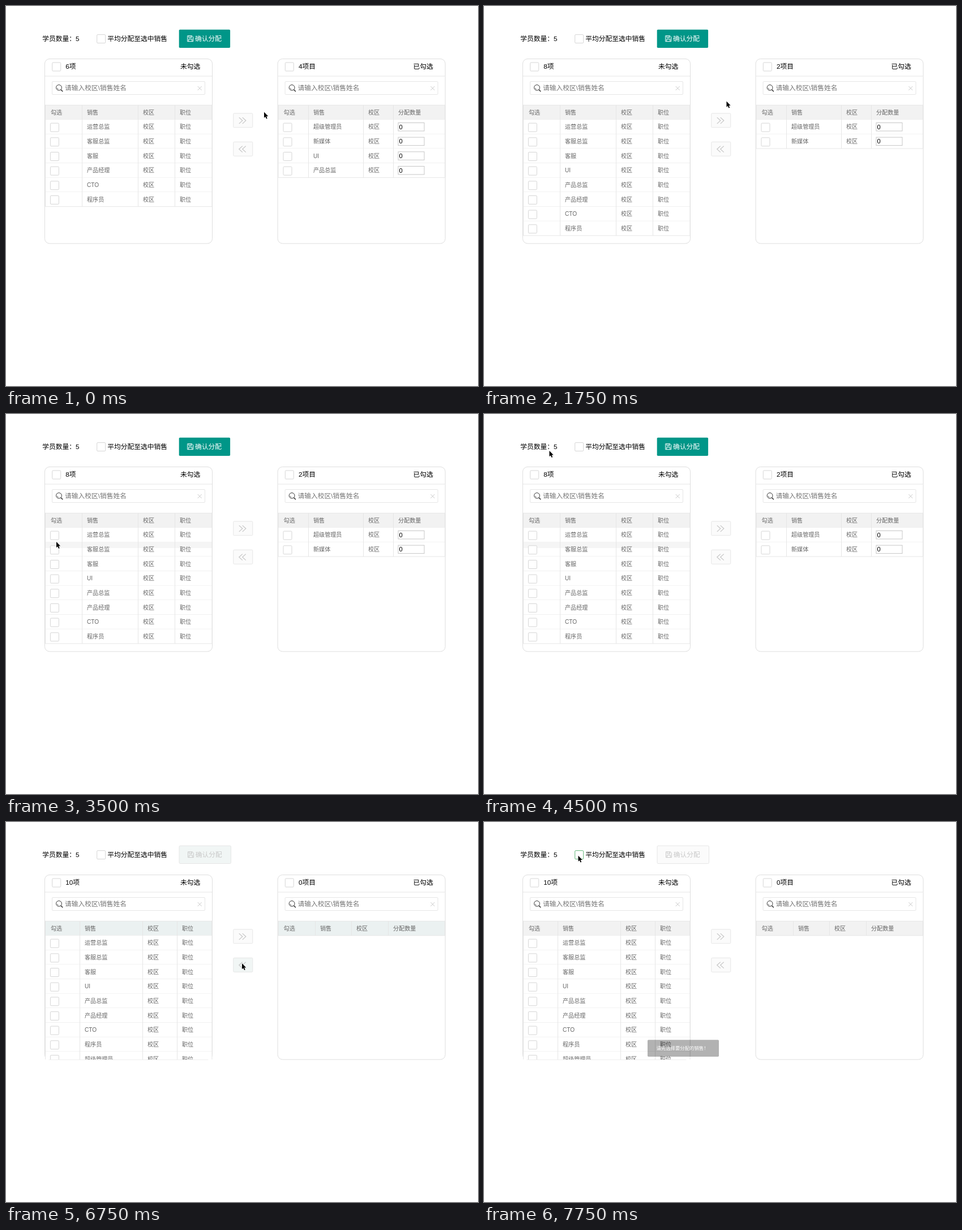
Recreate the animation shown at these times as an HTML page. Size 834 by 672 pixels, loop 8 s.

```html
<!DOCTYPE html>
<html lang="zh-CN">
<head>
<meta charset="utf-8">
<style>
  html, body { margin: 0; width: 100%; height: 100%; overflow: hidden; background: #fff; }
  svg { display: block; }
  text { font-family: "Liberation Sans", "Noto Sans CJK SC", "Noto Sans CJK", sans-serif; white-space: pre; }
</style>
</head>
<body>
<svg id="stage" width="834" height="672" viewBox="0 0 834 672">
  <defs><clipPath id="panelClip"><rect x="60" y="90" width="320" height="330"/></clipPath></defs>
  <g id="scene"></g>
  <path id="cursor" d="M0 0V10.3L2.3 8.2L4 12L5.7 11.2L4.1 7.5H7.2Z" fill="#000" stroke="#fff" stroke-width=".9" paint-order="stroke"/>
</svg>
<script>
const LOOP = 8000, STEP = 250;
const ROW_TOP = 200.8, ROW_H = 25.65, PANEL_SHIFT = 411.6;
const LINE = '#e6e6e6', GREEN = '#5fb878', TEAL = '#009688';

const STAFF = ['运营总监', '客服总监', '客服', 'UI', '产品总监', '产品经理', 'CTO', '程序员', '超级管理员', '新媒体'];
const pick = (...ids) => ids.map(i => STAFF[i]);

// Pointer stops: time, x, y
const POINTER = [
  [0, 456, 187.5], [250, 442, 177], [500, 428.5, 168.5],
  [2250, 340, 150], [2500, 150, 158], [2750, 89.5, 210], [3000, 88, 212], [3250, 88, 214],
  [3500, 89, 226], [3750, 92, 208], [4000, 102, 152], [4250, 112, 92], [4500, 115.5, 65],
  [4750, 150, 58], [5000, 300, 112], [5250, 450, 182], [5500, 496, 210], [5750, 500, 150],
  [6000, 498.5, 105], [6500, 417, 250], [7000, 284.5, 123], [7250, 230, 95], [7500, 172, 64], [7750, 166.5, 59.5]
];

function rect(x, y, w, h, fill, stroke = 'none', r = 0) {
  return `<rect x="${x}" y="${y}" width="${w}" height="${h}" rx="${r}" fill="${fill}" stroke="${stroke}"/>`;
}
function line(x1, y1, x2, y2, color = LINE) {
  return `<path d="M${x1} ${y1}L${x2} ${y2}" stroke="${color}" fill="none"/>`;
}
// y is the visual centre of the glyphs
function label(x, y, str, size = 11.76, fill = '#000') {
  return `<text x="${x}" y="${y + size * 0.37}" font-size="${size}" fill="${fill}">${str}</text>`;
}
function small(x, y, str) {
  return label(x, y, str, 10.1, '#666');
}

function checkbox(x, y, { checked = false, hover = false, fill = '#fff' } = {}) {
  const edge = checked || hover ? GREEN : '#d5d5d5';
  const tick = checked
    ? `<path d="M${x + 3.5} ${y + 7.5}l3 3l5.5 -6" fill="none" stroke="#fff" stroke-width="1.4"/>` : '';
  return rect(x, y, 15, 15, checked ? GREEN : fill, edge, 1.5) + tick;
}

function chevrons(x, y, dir, active, tint) {
  const arrow = dx => `<path d="M${dx} -5.5L${dx + 6} 0L${dx} 5.5"/>`;
  return rect(x, y, 34, 25, active ? TEAL : tint ? '#f1f6f5' : '#fbfbfb', active ? TEAL : LINE, 1.5) +
    `<g transform="translate(${x + 16} ${y + 12.8}) scale(${dir} 1)" fill="none" stroke="${active ? '#fff' : '#c4c4c4'}" stroke-width="1.2">` +
    arrow(-6) + arrow(0) + '</g>';
}

function confirmButton(disabled, tint) {
  const ink = disabled ? '#c9c9c9' : '#fff', dx = disabled ? 0.8 : 0;
  const box = disabled
    ? rect(306, 42, 91.5, 31.5, tint ? '#f1f6f5' : '#fbfbfb', LINE, 2)
    : rect(305.7, 41.8, 90.4, 32.2, TEAL, 'none', 1.7);
  return box +
    `<path transform="translate(${320.7 + dx} 52.7)" d="M0 0H7.8L10 2.2V10H0ZM2.3 0V3.4H7V0M2 10V6H8V10M5.4 1V2.6" fill="none" stroke="${ink}"/>` +
    label(334 + dx, 58, '确认分配', 11.76, ink);
}

function searchBox() {
  return rect(81.5, 133.5, 270, 23, '#fff', LINE, 1.5) +
    '<circle cx="93.5" cy="144.3" r="4.9" fill="none" stroke="#333"/>' +
    '<path d="M97 148L100.3 151.2" stroke="#333" stroke-width="1.6"/>' +
    '<path d="M90.6 145a3 3 0 0 0 2 2.3" fill="none" stroke="#333" stroke-width=".8"/>' +
    label(104, 145, '请输入校区\\销售姓名', 11.76, '#757575') +
    '<path d="M338.7 142l7 7m0-7l-7 7" stroke="#c9c9c9"/>';
}

function panel({ count, title, heads, cols, rows, amounts, hover = -1, stripe, checked, headHover, tint }) {
  const left = 69.5, right = 364, bottom = ROW_TOP + rows.length * ROW_H;
  const starts = [left + 1, ...cols];
  let out = rect(68.5, 93.5, 296, 326.5, '#fff', '#dedede', 8.5) +
    line(69, 124, 364, 124) +
    checkbox(81.7, 100, { checked, hover: headHover }) +
    label(105.3, 107, count) + label(308, 107, title) + searchBox();

  out += '<g clip-path="url(#panelClip)">' +
    rect(left, 175.3, right - left, 25.5, tint ? '#ebf1f1' : '#f2f2f2', LINE);
  heads.forEach((head, i) => out += small(starts[i] + 8.5, 188, head));

  rows.forEach((name, i) => {
    const top = ROW_TOP + i * ROW_H, mid = top + 12.9, hot = i === hover;
    out += rect(left, top, right - left, ROW_H, hot ? '#f2f2f2' : '#fff');
    if (stripe && i === 1) out += rect(left, top, right - left, 10.5, '#f5f5f5');
    out += line(left, top + ROW_H, right, top + ROW_H) +
      checkbox(78.4, top + 6.4, { checked, fill: hot ? '#f0f0f0' : '#fff' }) +
      small(starts[1] + 8.5, mid, name) + small(starts[2] + 8.5, mid, '校区');
    out += amounts
      ? rect(281.4, top + 5.7, 46, 14.5, '#fff', '#c6c6c6') + label(283, mid, '0', 11.2)
      : small(starts[3] + 8.5, mid, '职位');
  });
  [left, ...cols, right].forEach(x => out += line(x, 175.3, x, bottom));
  return out + '</g>';
}

function toast() {
  return '<g opacity=".5">' + rect(289, 385.3, 126, 29.7, 'rgba(0,0,0,.6)', 'none', 1.7) +
    label(304.5, 400.3, '请先选择要分配的销售！', 8.4, '#fff') + '</g>';
}

function scene(t) {
  if (t >= 1250 && t < 1500) return label(161, 57.5, '平均分配至选中销售') + confirmButton(false);

  const before = t < 1250, moved = t >= 6750;
  const tint = moved && t < 7250;
  const picked = t >= 6250 && !moved;
  const leftRows = before ? pick(0, 1, 2, 5, 6, 7) : moved ? STAFF : STAFF.slice(0, 8);
  const rightRows = before ? pick(8, 9, 3, 4) : moved ? [] : pick(8, 9);
  const leftHover = t >= 2750 && t < 3500 || t >= 3750 && t < 4000 ? 0 : -1;

  return label(64.3, 57.5, '学员数量：5') +
    checkbox(160.7, 50.6, { hover: t >= 7750 }) +
    label(179.3, 57.5, '平均分配至选中销售') +
    confirmButton(moved, tint) +
    panel({
      count: leftRows.length + '项', title: '未勾选', heads: ['勾选', '销售', '校区', '职位'],
      cols: moved ? [130.5, 241.5, 302.5] : [134.5, 233.5, 298.5],
      rows: leftRows, hover: leftHover, stripe: t >= 3500 && t < 6250, tint
    }) +
    `<g transform="translate(${PANEL_SHIFT} 0)">` +
    panel({
      count: rightRows.length + '项目', title: '已勾选', heads: ['勾选', '销售', '校区', '分配数量'],
      cols: moved ? [134.9, 198.9, 263.9] : [122.9, 219.9, 272.9],
      rows: rightRows, amounts: true, hover: t >= 5500 && t < 5750 ? 0 : -1,
      checked: picked, headHover: t >= 6000 && !moved, tint
    }) + '</g>' +
    chevrons(401.8, 189.8, 1, false, false) + chevrons(401.8, 240.3, -1, picked, tint) +
    (t >= 7750 ? toast() : '');
}

const sceneEl = document.getElementById('scene');
const cursorEl = document.getElementById('cursor');
let shown = -1;

function render(t) {
  const step = Math.floor(t / STEP);
  if (step === shown) return;
  shown = step;
  const now = step * STEP;
  const [, x, y] = POINTER.findLast(stop => stop[0] <= now);
  sceneEl.innerHTML = scene(now);
  cursorEl.setAttribute('transform', `translate(${x} ${y})`);
}

const began = performance.now();
function tick() {
  render((performance.now() - began) % LOOP);
  requestAnimationFrame(tick);
}
tick();
</script>
</body>
</html>
```
